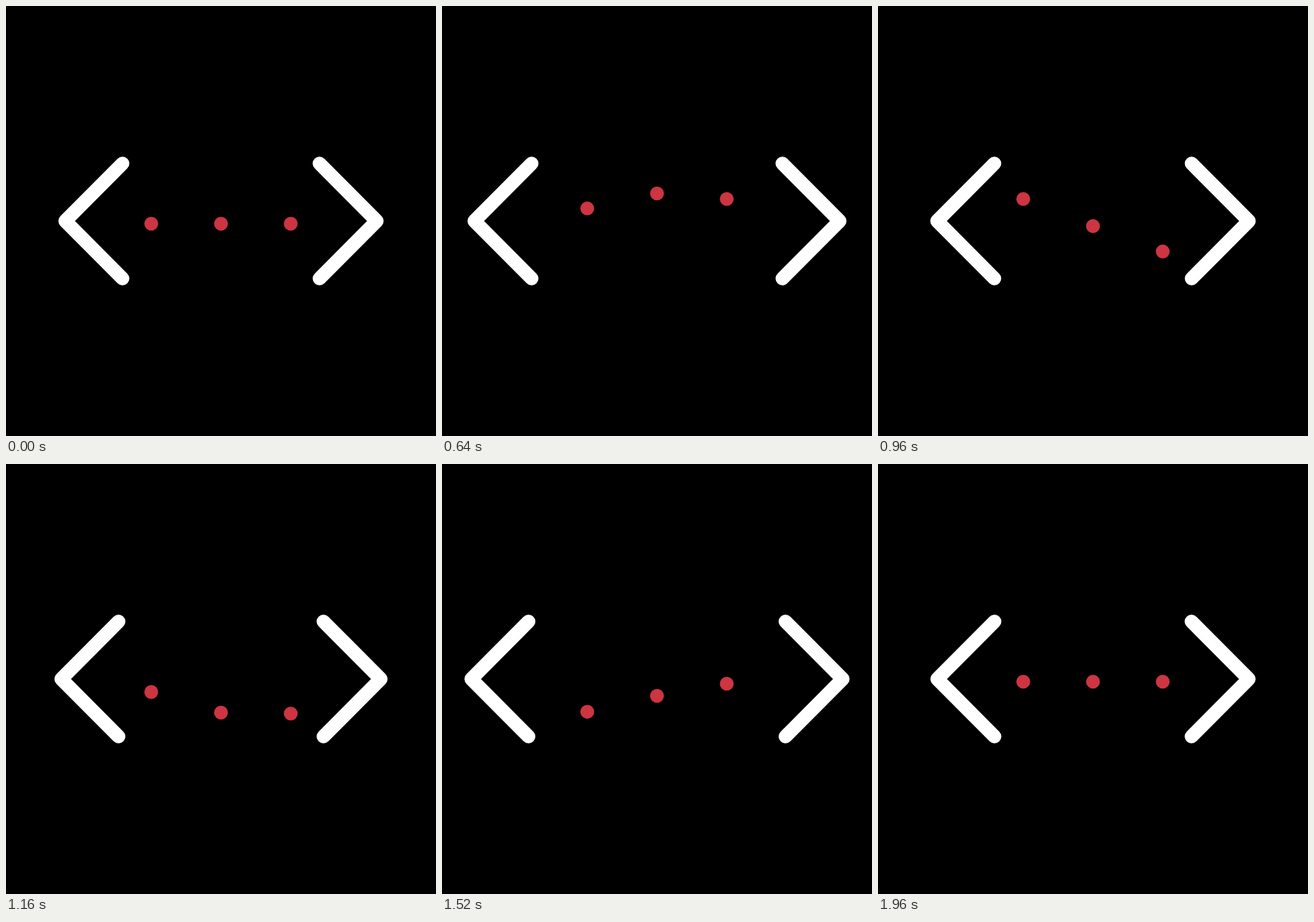
Animation, 640 px wide and 640 px high, one loop 2000 ms. Source, as an HTML page:

```html
<!DOCTYPE html>
<html lang="en">
<head>
<meta charset="utf-8">
<title>Code loader</title>
<style>
  html, body { margin: 0; width: 100%; height: 100%; overflow: hidden; background: #000; }
  svg { display: block; width: 100vw; height: 100vh; }
  path { fill: none; stroke: #fff; stroke-width: 20.4; stroke-linecap: round; stroke-linejoin: round; }
  circle { fill: #cc3541; }
</style>
</head>
<body>
<svg viewBox="0 0 640 640">
  <path id="left" d="M173.4 234.4 L88.2 320 L173.4 405.6"/>
  <path id="right" d="M466.6 234.4 L551.8 320 L466.6 405.6"/>
  <circle class="dot" cx="216.2" cy="324" r="10.3"/>
  <circle class="dot" cx="320" cy="324" r="10.3"/>
  <circle class="dot" cx="423.8" cy="324" r="10.3"/>
</svg>
<script>
  const STEP = 40, LOOP = 2000, LAG = 4;
  const SPREAD = 45, RISE = -46, DIP = 49.5;

  // Same as CSS cubic-bezier(x1, 0, x2, 1), solved by bisection.
  const bezier = (x1, x2) => p => {
    let low = 0, high = 1, t = 0.5;
    for (let i = 0; i < 24; i++) {
      const u = 1 - t;
      if (3 * u * u * t * x1 + 3 * u * t * t * x2 + t ** 3 < p) low = t;
      else high = t;
      t = (low + high) / 2;
    }
    return t * t * (3 - 2 * t);
  };

  const open = bezier(0.65, 0.48), close = bezier(0.56, 0.22);
  const lift = bezier(0.58, 0.65), drop = bezier(0.42, 0.55), settle = bezier(0.45, 0.45);
  const mix = (from, to, amount) => from + (to - from) * amount;

  function gapAt(step) {
    const s = step % 24;
    return s < 12 ? SPREAD * open(s / 12) : SPREAD * (1 - close((s - 12) / 12));
  }

  function bounceAt(s) {
    if (s <= 0 || s >= 40) return 0;
    if (s < 12) return mix(0, RISE, lift(s / 12));
    if (s < 26) return mix(RISE, DIP, drop((s - 12) / 14));
    return mix(DIP, 0, settle((s - 26) / 14));
  }

  const left = document.getElementById("left");
  const right = document.getElementById("right");
  const dots = [...document.querySelectorAll(".dot")];

  function draw(ms) {
    // The first pose is held for two steps.
    const step = Math.max(0, Math.floor((ms % LOOP) / STEP) - 1);
    const gap = gapAt(step);
    left.setAttribute("transform", `translate(${-gap} 0)`);
    right.setAttribute("transform", `translate(${gap} 0)`);
    dots.forEach((dot, i) => dot.setAttribute("cy", 324 + bounceAt(step - (2 - i) * LAG)));
  }

  const start = performance.now();
  function tick() {
    draw(performance.now() - start);
    requestAnimationFrame(tick);
  }
  tick();
</script>
</body>
</html>
```
